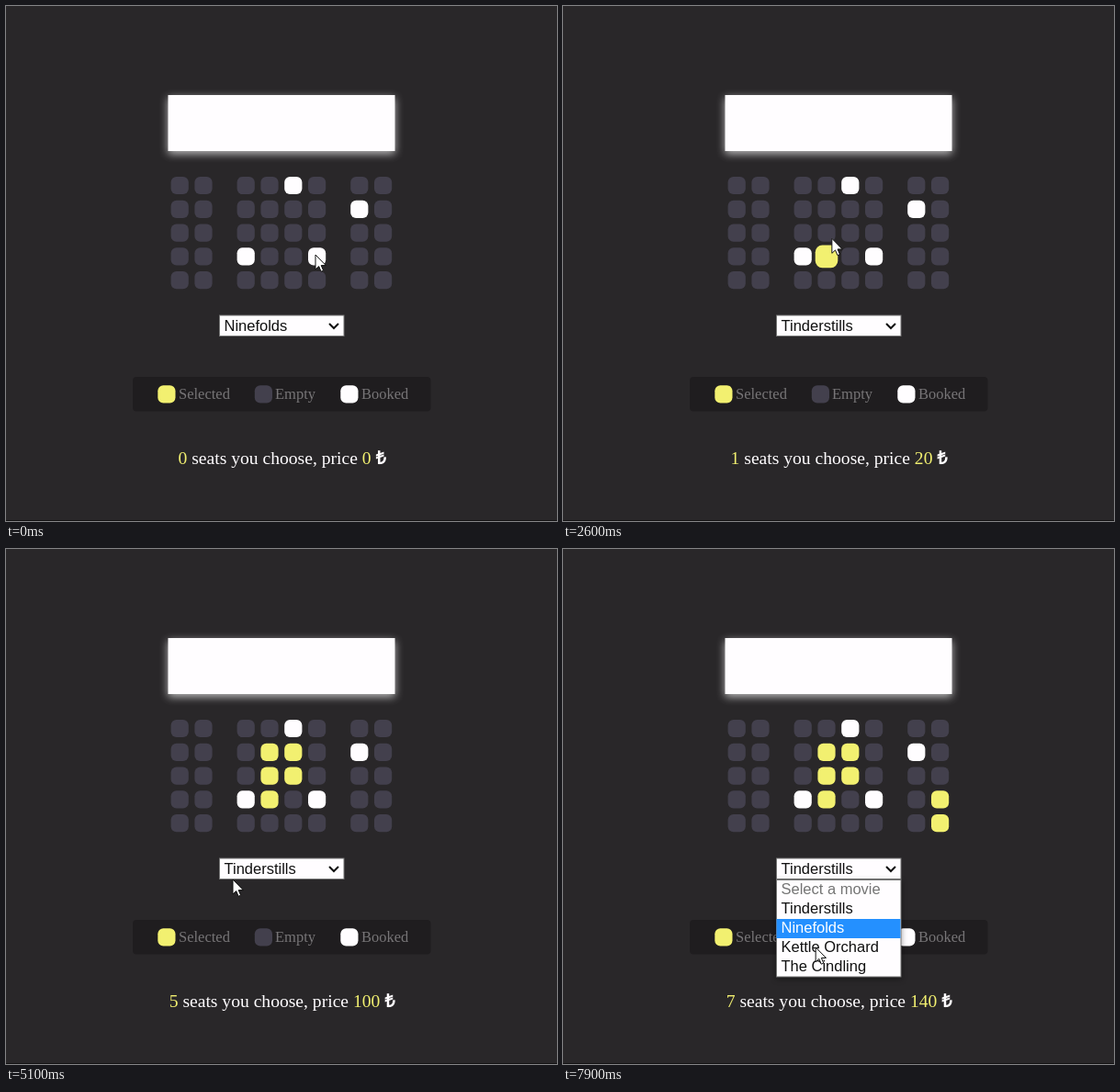
Recreate the animation shown at these times as an HTML page. Size 600 by 561 pixels, loop 8000 ms.

```html
<!DOCTYPE html>
<html lang="en">
<head>
<meta charset="utf-8">
<title>Seat picker</title>
<style>
  html, body { margin: 0; width: 100%; height: 100%; overflow: hidden; background: #292729; }
  svg { display: block; width: 600px; height: 561px; }
  .screen { fill: #fffdff; filter: drop-shadow(0 3px 5px rgba(255, 255, 255, .7)); }
  .seat { fill: #43404d; }
  .booked { fill: #fffdff; }
  .picked { fill: #f2f070; }
  .ui { font: 16.5px "Liberation Sans", Arial, sans-serif; fill: #111; }
  .legend { font: 16.5px "Liberation Serif", "Times New Roman", serif; fill: #777577; }
  .total { font: 19.6px "Liberation Serif", "Times New Roman", serif; fill: #fffdff; }
  .total .num { fill: #f2f070; }
  .total .unit { font-weight: bold; }
  .box { fill: #fffdff; stroke: #767676; }
  .list { filter: drop-shadow(0 2px 3px rgba(0, 0, 0, .4)); }
  .ui .off { fill: #757575; }
  .ui .lit { fill: #fff; }
  .pointer { fill: #fff; stroke: #111; stroke-linejoin: round; }
</style>
</head>
<body>
<svg viewBox="0 0 600 561">
  <defs><rect id="chair" x="-9.6" y="-9.6" width="19.2" height="19.2" rx="6"/></defs>
  <rect width="600" height="561" fill="#292729"/>
  <rect y="560" width="600" height="1" fill="#121112"/>
  <rect class="screen" x="176.5" y="97" width="247" height="61"/>
  <g id="seats"></g>

  <g class="legend">
    <rect x="138" y="404" width="324.5" height="37.5" rx="4" fill="#1f1d1f"/>
    <use class="picked" href="#chair" x="174.9" y="422.8"/>
    <text x="188" y="428">Selected</text>
    <use class="seat" href="#chair" x="280.4" y="422.8"/>
    <text x="293" y="428">Empty</text>
    <use class="booked" href="#chair" x="373.9" y="422.8"/>
    <text x="387" y="428">Booked</text>
  </g>

  <text class="total" id="total" y="498.5"><tspan class="num" id="count"></tspan> seats you choose, price <tspan class="num" id="price"></tspan> <tspan class="unit">₺</tspan></text>

  <g class="ui">
    <rect class="box" x="232.5" y="337" width="135.5" height="22.5"/>
    <text id="chosen" x="237.5" y="353.5"></text>
    <path d="M352 346l5 5 5-5" fill="none" stroke="#111" stroke-width="2"/>
    <g id="list">
      <rect class="box list" x="232.5" y="360.5" width="135.5" height="105.5"/>
      <rect id="bar" x="232.5" width="135" height="21" fill="#2490ff"/>
    </g>
  </g>

  <path id="arrow" class="pointer" d="M0 0V16L3.7 12.6 6.1 18.3 8.6 17.2 6.2 11.6H11.3Z"/>
  <g id="hand" class="pointer">
    <path d="M-2 1.5Q-2 0-.2 0 1.6 0 1.6 1.5V8Q2 6.6 3.4 6.8 5 7 5 8.6 5.4 7.6 6.8 7.9 8.2 8.2 8.2 9.8 8.6 9 9.6 9.2 11 9.5 11 11.2V15Q11 18 9 20V23H0V21L-5.5 14Q-6.4 12.4-5 11.6-3.6 11-2 13.2Z"/>
    <path d="M1.6 8v3M5 9v2.5M8.2 10v2M2 15v4M4.7 15v4M7.4 15v4" fill="none" stroke-width=".8"/>
  </g>
</svg>

<script>
const LOOP = 8000, STEP = 100, LAG = 100;
const PITCH = 25.8, AISLE = 20.4, REACH = 12, PRICE = 20;
const LIST_TOP = 361, ROW = 21;
const FILMS = ['Select a movie', 'Tinderstills', 'Ninefolds', 'Kettle Orchard', 'The Cindling'];
const BOOKED = ['4,0', '6,1', '2,3', '5,3'];
const $ = id => document.getElementById(id);

// The pointer rests between moves and presses each time it departs.
const HOME = [337, 271];
const MOVES = [ // depart, arrive, x, y
  [200, 600, 300, 341], [700, 1100, 275, 386], [1400, 1900, 292, 286],
  [2100, 2200, 292, 282], [2300, 2700, 293, 248], [3000, 3300, 286, 220],
  [3700, 4100, 315, 249], [4200, 4700, 315, 224], [4800, 5100, 247, 360],
  [5100, 5600, 416, 298], [5700, 6100, 403, 275], [6300, 7200, 290, 343],
  [7200, 8100, 273, 447]
];

function make(tag, parent, attrs, text = '') {
  const el = document.createElementNS('http://www.w3.org/2000/svg', tag);
  for (const key in attrs) el.setAttribute(key, attrs[key]);
  el.textContent = text;
  return parent.appendChild(el);
}

const seats = [];
for (let c = 0; c < 8; c++) {
  for (let r = 0; r < 5; r++) {
    const x = 189.2 + PITCH * c + AISLE * ((c > 1) + (c > 5));
    const y = 195.5 + PITCH * r;
    const booked = BOOKED.includes(c + ',' + r);
    const el = make('use', $('seats'), { href: '#chair', class: booked ? 'booked' : 'seat' });
    el.setAttribute('transform', `translate(${x} ${y})`);
    if (!booked) seats.push({ x, y, el });
  }
}

const options = FILMS.map((name, i) =>
  make('text', $('list'), { x: 237.5, y: LIST_TOP + 14.7 + ROW * i }, name));

function pointerAt(t) {
  let [x, y] = HOME, moving = false;
  for (const [depart, arrive, toX, toY] of MOVES) {
    if (t < depart) break;
    const k = Math.min(1, (t - depart) / (arrive - depart)), e = k * k * (3 - 2 * k);
    x += (toX - x) * e;
    y += (toY - y) * e;
    moving = k > 0 && k < 1;
  }
  return { x, y, moving };
}

const seatAt = p =>
  seats.find(s => Math.max(Math.abs(s.x - p.x), Math.abs(s.y - p.y)) < REACH);
const optionAt = p => Math.floor((p.y - LIST_TOP) / ROW);
const onSelect = p => p.x > 232 && p.x < 368 && p.y > 337 && p.y < 360;

// Replays every press up to time t.
function pageAt(t) {
  const picked = new Set();
  let open = false, chosen = 2;
  for (const [depart] of MOVES) {
    if (depart > t) break;
    const p = pointerAt(depart), seat = seatAt(p);
    if (open) {
      chosen = optionAt(p);
      open = false;
    } else if (onSelect(p)) {
      open = true;
    } else if (seat) {
      picked.add(seat);
    }
  }
  return { picked, open, chosen };
}

function render(t) {
  const seen = Math.max(0, t - LAG);
  const { picked, open, chosen } = pageAt(seen);
  const past = pointerAt(seen), hover = open ? null : seatAt(past);

  for (const s of seats) {
    s.el.setAttribute('class', picked.has(s) ? 'picked' : 'seat');
    s.el.setAttribute('transform',
      `translate(${s.x} ${s.y}) scale(${s === hover ? 1.28 : 1})`);
  }

  const price = String(picked.size * PRICE);
  $('count').textContent = picked.size;
  $('price').textContent = price;
  $('total').setAttribute('x', 187.5 - 4.9 * (price.length - 1));

  const over = optionAt(past), lit = over > 0 ? over : chosen;
  $('chosen').textContent = FILMS[chosen];
  $('list').setAttribute('display', open ? 'inline' : 'none');
  $('bar').setAttribute('y', LIST_TOP + ROW * lit);
  options.forEach((el, i) =>
    el.setAttribute('class', i === 0 ? 'off' : i === lit ? 'lit' : ''));

  const { x, y } = pointerAt(t), hand = hover && !past.moving;
  for (const [id, on] of [['arrow', !hand], ['hand', hand]]) {
    $(id).setAttribute('transform', `translate(${x} ${y})`);
    $(id).setAttribute('visibility', on ? 'visible' : 'hidden');
  }
}

const start = performance.now();
function tick() {
  const t = (performance.now() - start) % LOOP;
  render(Math.floor(t / STEP) * STEP);
  requestAnimationFrame(tick);
}
tick();
</script>
</body>
</html>
```
